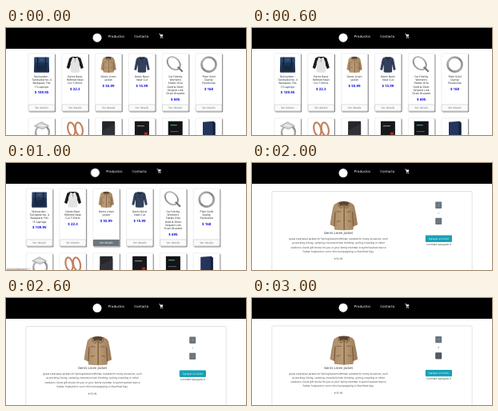
These frames come from a looping animation (300 by 134 pixels, 4000 ms). An HTML page:

```html
<!DOCTYPE html>
<html lang="es">
<head>
<meta charset="utf-8">
<title>Tienda</title>
<style>
html, body { margin: 0; width: 100%; height: 100%; overflow: hidden; background: #fff; }
svg { display: block; width: 100vw; height: 100vh; }
text { font: 3.4px "Noto Sans", "Open Sans", sans-serif; fill: #212529; text-anchor: middle; text-rendering: geometricPrecision; }
.nav text { font-size: 4.3px; font-weight: 500; fill: #fff; text-anchor: start; }
.price { font-size: 4.4px; font-weight: 700; fill: #1212e6; }
.more text { fill: #6c757d; }
.hover text { fill: #fff; }
.page text { font-size: 3.1px; fill: #33383d; }
.page .title { font-size: 4.2px; font-weight: 500; }
.page .light { fill: #fff; }

.nav, .list, .page, .hover, .one, .two, .minus { animation: 4s step-end infinite; }
.nav { animation-name: nav; }
.list { animation-name: list; }
.page { animation-name: page; }
.hover { animation-name: hover; }
.one { animation-name: one; }
.two { animation-name: two; }
.minus { animation-name: minus; }
@keyframes nav {
  0% { transform: translate(0, 0); }
  25% { transform: translate(-2.6px, 0); }
  50% { transform: translate(0, .4px); }
  75%, 100% { transform: translate(0, 0); }
}
@keyframes list {
  0% { transform: translate(0, 0); visibility: visible; }
  25% { transform: translate(-2.8px, 0); visibility: visible; }
  50%, 100% { transform: translate(0, 0); visibility: hidden; }
}
@keyframes page {
  0% { transform: translate(0, .6px); visibility: hidden; }
  50% { transform: translate(0, .6px); visibility: visible; }
  75%, 100% { transform: translate(0, 0); visibility: visible; }
}
@keyframes hover { 0% { opacity: 0; } 25% { opacity: 1; } 50%, 100% { opacity: 0; } }
@keyframes one { 0% { opacity: 1; } 75%, 100% { opacity: 0; } }
@keyframes two { 0% { opacity: 0; } 75%, 100% { opacity: 1; } }
@keyframes minus { 0% { fill: #6c757d; } 75%, 100% { fill: #50575f; } }
</style>
</head>
<body>
<svg viewBox="0 0 300 134" preserveAspectRatio="none">
  <defs>
    <filter id="shade" x="-10%" y="-10%" width="125%" height="125%">
      <feDropShadow dx=".9" dy=".9" stdDeviation=".6" flood-color="#222" flood-opacity=".7"/>
    </filter>
    <filter id="glow" x="-5%" y="-5%" width="110%" height="110%">
      <feDropShadow dx="0" dy="0" stdDeviation=".7" flood-color="#333" flood-opacity=".3"/>
    </filter>
    <linearGradient id="tan">
      <stop offset="0" stop-color="#a88a67"/><stop offset=".5" stop-color="#bd9d77"/><stop offset="1" stop-color="#987a59"/>
    </linearGradient>
    <linearGradient id="steel" x2="1" y2="1">
      <stop offset="0" stop-color="#c9c9c9"/><stop offset=".5" stop-color="#858585"/><stop offset="1" stop-color="#b5b5b5"/>
    </linearGradient>

    <g id="pack">
      <path d="M-9 1H9L9.6 19Q9.5 20 8.5 20H-8.5Q-9.5 20-9.6 19Z" fill="#1f3251"/>
      <path d="M-9 1H9V7.5H-9Z" fill="#2b456d"/>
      <path d="M-5 1V13M5 1V13" stroke="#121a29" stroke-width="1.1"/>
      <path d="M-6.5 11H6.5V18.5H-6.5Z" fill="#182843"/>
      <path d="M-2 4H2" stroke="#7d6247"/>
    </g>
    <g id="tee">
      <path d="M-3.5.3L-7 2Q-9 8-10.5 14L-7.5 15.5-5 9H5L7.5 15.5 10.5 14Q9 8 7 2L3.5.3Z" fill="#1b1b1f"/>
      <path d="M-2.8.5Q0 3 2.8.5L5.5 7.5 5.8 19.5Q0 20.8-5.8 19.5L-5.5 7.5Z" fill="#e3e3e3"/>
      <path d="M-3 .5Q0 3.5 3 .5" fill="none" stroke="#222" stroke-width=".9"/>
      <path d="M0 2.5V7" stroke="#777" stroke-width=".6"/>
    </g>
    <g id="jacket">
      <path d="M-3.3.6Q-6.6 1.3-7.3 3.5-8.7 9.5-9.6 16.4L-6.7 17.6-6.5 19.8Q0 20.7 6.5 19.8L6.7 17.6 9.6 16.4Q8.7 9.5 7.3 3.5 6.6 1.3 3.3.6Z" fill="url(#tan)"/>
      <path d="M-6 7.5L-6.6 17.5M6 7.5L6.6 17.5" stroke="#715638" stroke-width=".6"/>
      <path d="M-3.6.7Q0-.5 3.6.7L2.6 3.6 0 2.6-2.6 3.6Z" fill="#5c4433"/>
      <path d="M-3.6.7L-4 3-1.8 5 0 2.8 1.8 5 4 3 3.6.7" fill="none" stroke="#86684a" stroke-width=".6"/>
      <path d="M.2 3V20" stroke="#7b5d40" stroke-width=".8"/>
      <path d="M-5 7.3H-1.8M2 7.3H5M-5.2 14.2L-2.4 13.6M2.6 13.6L5.2 14.2" stroke="#7b5d40" stroke-width=".5"/>
    </g>
    <g id="shirt">
      <path d="M-3 .5Q-6.5 1.2-7.2 3.5L-9.7 16.5-7 17.3-5.2 10V19.5Q0 20.5 5.2 19.5V10L7 17.3 9.7 16.5 7.2 3.5Q6.5 1.2 3 .5Z" fill="#33415b"/>
      <path d="M-3 .5Q0 3 3 .5L1.8 3.4H-1.8Z" fill="#1c2638"/>
      <path d="M0 3V8M-5.2 10L-5 5M5.2 10L5 5" stroke="#1f2a3f" stroke-width=".6"/>
    </g>
    <g id="chain" fill="none" stroke="url(#steel)">
      <ellipse cx="-2" cy="8.5" rx="9.2" ry="6.8" transform="rotate(45 -2 8.5)" stroke-width="1.8"/>
      <path d="M3 13L9 19" stroke="#777" stroke-width="2.2"/>
    </g>
    <g id="ring" fill="none">
      <circle cy="10" r="8.9" stroke="url(#steel)" stroke-width="2.6"/>
      <circle cy="10" r="9.9" stroke="#777" stroke-width=".4"/>
    </g>
    <g id="stone" fill="none">
      <circle cx="1" cy="14" r="8.5" stroke="url(#steel)" stroke-width="2.4"/>
      <path d="M-9 6L0 1 9 6 1 10Z" fill="#d3d5d8" stroke="#8c8f94" stroke-width=".7"/>
      <path d="M-4 5L4 6" stroke="#fff"/>
    </g>
    <g id="hoops" fill="none" stroke="#c4825f" stroke-width="2.2">
      <ellipse cx="-4.5" cy="10" rx="4.4" ry="8.5" transform="rotate(-12 -4.5 10)"/>
      <ellipse cx="5" cy="10" rx="4.4" ry="8.5" transform="rotate(-12 5 10)"/>
    </g>
    <g id="drive">
      <rect x="-8" width="16" height="24" rx="1" fill="#24262a"/>
      <path d="M-8 12L8 3V24H-8Z" fill="#303237"/>
    </g>
    <g id="disk">
      <rect x="-9" width="18" height="24" rx=".8" fill="#17181b"/>
      <path d="M-6 6H3" stroke="#aaa" stroke-width=".9"/>
      <path d="M3 14H7V17H3Z" fill="#b02a2a"/>
    </g>
    <g id="board">
      <rect x="-9" width="18" height="24" rx=".6" fill="#121417"/>
      <path d="M-6 5H2" stroke="#53a9a6"/>
      <path d="M-6 13H4" stroke="#777" stroke-width=".8"/>
    </g>
    <g id="box">
      <path d="M-7.5 1L6 0 8 2V24H-7.5Z" fill="#25345c"/>
      <path d="M5 0L8 2V24H5Z" fill="#161f38"/>
    </g>
  </defs>

  <rect width="300" height="134" fill="#fff"/>

  <g class="list">
    <g id="cards"></g>
    <g class="hover more">
      <rect x="111.8" y="95.9" width="32.8" height="8" rx=".7" fill="#6c757d"/>
      <text x="128.2" y="101.1">Ver details</text>
    </g>
  </g>
  <g class="hover">
    <rect y="131.4" width="31" height="2.6" fill="#e4e6e9"/>
    <text x="1" y="133.5" style="font-size:2.5px;fill:#555;text-anchor:start">localhost:3000/item/3</text>
  </g>

  <g class="page">
    <rect x="25" y="35" width="250" height="120" rx="1.5" fill="#fff" stroke="#c8c8c8" stroke-width=".4" filter="url(#glow)"/>
    <use href="#jacket" transform="translate(114.8 47.2) scale(1.8)"/>
    <text class="title" x="108" y="88.9">Gents Linen Jacket</text>
    <g id="about"></g>
    <text x="108" y="120">$ 55.99</text>
    <rect x="229.2" y="48" width="8" height="8.3" rx=".8" fill="#6c757d"/>
    <text class="light" x="233.2" y="53.2">+</text>
    <text class="one" x="233.2" y="63.3">1</text>
    <text class="two" x="233.2" y="63.3">2</text>
    <rect class="minus" x="229.2" y="68.2" width="8" height="8.3" rx=".8"/>
    <text class="light" x="233.2" y="73.3">-</text>
    <rect x="216.8" y="90" width="33.2" height="8.3" rx=".8" fill="#17a2b8"/>
    <text class="light" x="233.4" y="95.2">Agregar al carrito</text>
    <text x="233.4" y="102.2">Cantidad Agregada 0</text>
  </g>

  <rect width="300" height="26" fill="#000"/>
  <g class="nav">
    <circle cx="114" cy="12.2" r="5.5" fill="#fff"/>
    <text x="127.5" y="11.6">Productos</text>
    <text x="160.2" y="11.6">Contacto</text>
    <path d="M191.3 7.4H192.4L193.2 10.6H195.7L196.4 8.2H192.6Z" fill="#fff"/>
    <path d="M191.2 7.3H192.4L193.4 11.4H196" fill="none" stroke="#fff" stroke-width=".5"/>
    <circle cx="193.6" cy="12.2" r=".55" fill="#fff"/><circle cx="195.7" cy="12.2" r=".55" fill="#fff"/>
  </g>
</svg>
<script>
const items = [
  ["pack", "Skolvarden -|Tundsekk No. 4|Backpack, Fits|15 Laptops", "109.95"],
  ["tee", "Gents Basic|Refined Neat|Cut T-Shirts", "22.3"],
  ["jacket", "Gents Linen|Jacket", "55.99"],
  ["shirt", "Gents Basic|Neat Cut", "15.99"],
  ["chain", "Carl Venby|Women's|Fables Orla|Gold &amp; Silver|Serpent Link|Chain Bracelet", "695"],
  ["ring", "Plain Gold|Dainty|Pavestone", "168"]
];
const nextRow = ["stone", "hoops", "drive", "disk", "board", "box"];
const about = [
  "great outerwear jackets for Spring/Autumn/Winter, suitable for many occasions, such",
  "as working, hiking, camping, mountain/rock climbing, cycling, traveling or other",
  "outdoors. Good gift choice for you or your family member. A warm hearted love to",
  "Father, husband or son in this harvestgiving or Evenfrost Day."
];

const lines = (rows, x, y, step) =>
  rows.map((row, i) => `<text x="${x}" y="${y + i * step}">${row}</text>`).join("");

const frame = (x, y, art) =>
  `<rect x="${x - 16.5}" y="${y}" width="33" height="72.2" rx=".8" fill="#fff" stroke="#ccc" stroke-width=".3" filter="url(#shade)"/>
   <use href="#${art}" x="${x}" y="${y + 3.7}"/>`;

function card([art, title, cost], i) {
  const x = 44.5 + i * 41.8;
  const rows = title.split("|");
  return frame(x, 32, art) + lines(rows, x, 62.2, 4.1) +
    `<text class="price" x="${x}" y="${66 + rows.length * 4.1}">$ ${cost}</text>
     <g class="more"><rect x="${x - 16.4}" y="95.9" width="32.8" height="8" rx=".7" fill="#fafafa" stroke="#929aa1" stroke-width=".35"/>
     <text x="${x}" y="101.1">Ver details</text></g>` +
    frame(x, 113, nextRow[i]);
}

document.getElementById("cards").innerHTML = items.map(card).join("");
document.getElementById("about").innerHTML = lines(about, 108, 95.7, 5.2);
</script>
</body>
</html>
```
